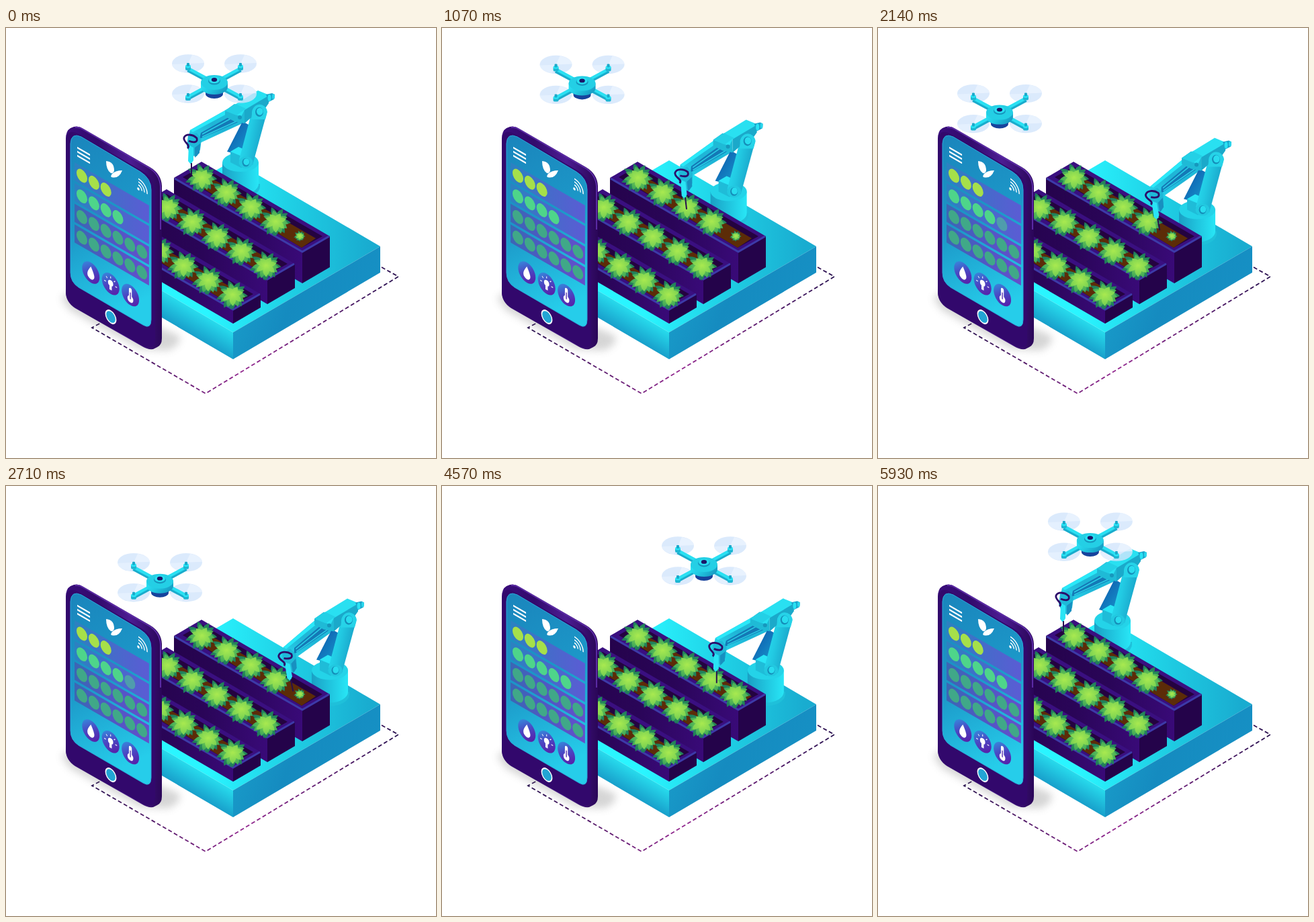
An HTML page that plays this animation: 640x640 px, repeating every 6000 ms.

```html
<!DOCTYPE html>
<html lang="en">
<head>
<meta charset="utf-8">
<title>Smart farm</title>
<style>
html, body { margin: 0; width: 100%; height: 100%; overflow: hidden; background: #fff; }
svg { display: block; width: 100%; height: 100%; }
</style>
</head>
<body>
<svg id="stage" viewBox="0 0 640 640"></svg>
<script>
const poly = (points, fill) => `<polygon points="${points}" fill="${fill}"/>`;
const path = (d, fill, extra = '') => `<path d="${d}" fill="${fill}" ${extra}/>`;
const line = (d, color, width, extra = '') =>
  `<path d="${d}" fill="none" stroke="${color}" stroke-width="${width}" ${extra}/>`;
const oval = (x, y, rx, ry, fill, extra = '') =>
  `<ellipse cx="${x}" cy="${y}" rx="${rx}" ry="${ry}" fill="${fill}" ${extra}/>`;
const group = (content, attrs) => `<g ${attrs}>${content}</g>`;
const at = (x, y) => `transform="translate(${x} ${y})"`;
const repeat = (n, make) => Array.from({ length: n }, (_, i) => make(i)).join('');
// Places a flat drawing on the isometric phone screen.
const onScreen = (x, y, content) => group(content, `transform="matrix(.866 .5 0 1 ${x} ${y})"`);

const gradient = (id, x1, y1, x2, y2, colors, units = 'objectBoundingBox') =>
  `<linearGradient id="${id}" x1="${x1}" y1="${y1}" x2="${x2}" y2="${y2}" gradientUnits="${units}">` +
  colors.map((c, i) => `<stop offset="${i / (colors.length - 1)}" stop-color="${c}"/>`).join('') +
  '</linearGradient>';
const spread = (id, x1, y1, x2, y2, colors) => gradient(id, x1, y1, x2, y2, colors, 'userSpaceOnUse');

const leafShades = [['#36a05a', '#1d7a5a'], ['#84d44e', '#2f9f5c'], ['#a6e850', '#62c654']];
const defs = `<defs>
  ${spread('top', 300, 0, 540, 0, ['#2af5ff', '#1fd0e5', '#19acd0'])}
  ${spread('sideL', 260, 408, 243, 437, ['#27daec', '#18a0cb'])}
  ${gradient('sideR', 0, 0, 1, .3, ['#1aa2cd', '#158bc0', '#1690c4'])}
  ${spread('dash', 128, 0, 584, 0, ['#28104f', '#93278f', '#28104f'])}
  ${gradient('boxL', 0, 0, 1, 0, ['#25034c', '#2a0558', '#390a78'])}
  ${gradient('phone', 0, 0, 1, 0, ['#3a0d7c', '#320a6c', '#4c1c92', '#2a0658'])}
  ${gradient('screen', 0, 0, .2, 1, ['#1a85bc', '#1c97c8', '#26cdea'])}
  ${gradient('bar', 0, 0, 1, 0, ['#2b82c1', '#456bca', '#5b5cd4'])}
  ${gradient('bar2', 0, 0, 1, 0, ['#3b66b4', '#5057c4', '#644fcb'])}
  ${gradient('button', 0, 0, .8, 1, ['#2f9fe4', '#4a49c4', '#5a1aa6'])}
  ${gradient('tube', 0, 0, 1, 0, ['#1a9fc4', '#20c4de', '#28e6f6'])}
  ${gradient('link', 0, 0, 1, .4, ['#2ae6f7', '#22c9e2', '#189fc6'])}
  ${gradient('back', 0, 0, 1, 1, ['#0e4fa6', '#1278bd', '#1aa0cf'])}
  ${gradient('beam', 0, 1, 1, 0, ['#2ad8ee', '#1fb4d6', '#20c4de'])}
  ${leafShades.map((colors, i) => spread('leaf' + i, 0, 0, 0, -25, colors)).join('')}
  <filter id="soft" x="-50%" y="-50%" width="200%" height="200%"><feGaussianBlur stdDeviation="6"/></filter>
</defs>`;

const outline = line('M559 356L584 370L297 544L128 446L141 439', 'url(#dash)', 1.8, 'stroke-dasharray="6 3.6"');

const platform =
  poly('338,197 557,325 338,453 119,325', 'url(#top)') +
  poly('119,325 338,453 338,493 119,365', 'url(#sideL)') +
  poly('557,325 557,364 338,493 338,453', 'url(#sideR)');

// A planter is placed by the right corner of its rim.
function planter(x, y, h) {
  return group(
    poly(`-232,-87 -41,24 -41,${24 + h} -232,${h - 87}`, 'url(#boxL)') +
    poly(`0,0 0,${h} -41,${24 + h} -41,24`, '#24034a') +
    poly('-232,-87 -191,-111 0,0 -41,24', '#3a0f80') +
    line('M-231 -86L-41 23L-1 0', '#3d3aa8', 3) +
    poly('-219,-88 -191,-104 -11,0 -42,17', '#240340') +
    poly('-210,-84 -191,-95 -21,3 -42,17', '#5c2c08'), at(x, y));
}

// Three rings of leaves whose tips droop outwards, lighter towards the middle.
function ring(r) {
  const n = 10 - r;
  return repeat(n, i => {
    const angle = (i + .5) * 360 / n - 180 + 13 * Math.sin(i * 5 + r * 2);
    const length = 25 - r * 4 + 2 * Math.sin(i * 7 + r);
    const w = (angle < 0 ? -1 : 1) * 9;
    return path(`M0 3Q${w} ${-length * .45} ${w * .5} ${-length}Q${-w} ${-length * .6} 0 3`,
      `url(#leaf${r})`, `transform="rotate(${angle})"`);
  });
}
const plant = group(repeat(3, ring), 'transform="scale(.95 .86)"');
const plants = (x, y, n) => repeat(n, i => group(plant, at(x + i * 36.6, y + i * 21.7)));

function phone() {
  const body = path('M89 165Q89 153 96 149L101 147Q108 145 115 150L214 207Q231 217 232 235L232 462Q232 472 225 475L219 478Q211 479 203 474L103 417Q89 408 89 392Z', 'url(#phone)') +
    line('M103 148Q109 147 115 151L213 208Q229 218 230 236L230 300', '#5b2ba4', 2) +
    path('M89 168Q90 149 107 157L203 213Q221 224 222 244L222 463Q222 480 205 474L103 416Q89 408 89 392Z', '#32086c') +
    path('M96 172Q97 155 112 162L200 214Q216 224 216 241L216 434Q216 449 204 442L108 386Q96 378 96 364Z', 'url(#screen)', 'stroke="#2aa9da"');

  const header = onScreen(106, 178, line('M0 0H22M0 6H22M0 12H22', '#fff', 2.4)) +
    path('M149 198Q161 199 161 212Q160 217 156 216Q149 211 149 198', '#fff') +
    path('M173 212Q168 225 157 222Q155 221 158 217Q163 212 173 212', '#fff') +
    onScreen(197, 239.5, oval(0, 0, 2, 2, '#fff') + repeat(3, i => {
      const r = 6 + i * 4.6;
      return line(`M0 ${-r}A${r} ${r} 0 0 1 ${r} 0`, '#fff', 1.8);
    }));

  const dots = ['#a6e04a', '#4ed58a', '#40a888', '#40a888'];
  const bars = repeat(4, row => onScreen(102, 213.6 + row * 30.7,
    `<rect y="-13.5" width="128" height="27" fill="url(#${row < 2 ? 'bar' : 'bar2'})"/>` +
    repeat([3, 5, 6, 6][row], i =>
      oval(12.7 + i * 20.6, 0, 9.3, 9.3, dots[row], row == 1 && i == 4 ? 'id="newDot"' : ''))));

  const icons = [
    path('M0 -9Q6 0 6 4A6 6 0 0 1 -6 4Q-6 0 0 -9', '#fff'),
    oval(0, -1, 4.5, 4.5, '#fff') + '<rect x="-2" y="3" width="4" height="6" fill="#fff"/>' +
      repeat(5, i => line('M0 -8V-11', '#fff', 1.2, `transform="rotate(${i * 45 - 90})"`)),
    line('M0 -8V5', '#fff', 5, 'stroke-linecap="round"') + oval(0, 6, 5, 5, '#fff') + line('M0 -4V6', '#5530b0', 1.6)
  ];
  const buttons = repeat(3, i =>
    onScreen(126.3 + i * 29.4, 364 + i * 16.8, oval(0, 0, 15, 15, 'url(#button)') + icons[i]));
  return body + header + bars + buttons +
    onScreen(156, 430, oval(0, 0, 8.8, 8.8, '#22a5d5', 'stroke="#fff" stroke-width="1.8"'));
}

const shadow = path('M82 402L100 390L215 440L258 458Q262 472 240 480L200 478L95 420Z', '#777', 'opacity=".3" filter="url(#soft)"');

const joint = (x, y, r) => oval(x, y, r, r * 1.15, '#158eb9') + oval(x + .8, y - .8, r * .8, r * .92, '#29dcef');

const base =
  path('M320 232V236A29 17 0 0 0 378 236V232Z', '#1fc0da') +
  path('M322 200V232A27 16 0 0 0 376 232V200Z', 'url(#tube)') +
  oval(349, 200, 27, 14, '#24d3e8');

const forearm =
  poly('329,121 274,152 271,164 289,171 354,141 352,125', 'url(#beam)') +
  poly('338,129 290,156 288,165 350,138', '#1479b6') +
  line('M336 134L292 158M345 138L292 162', '#29cde6', 1.6) +
  poly('329,121 274,152 278,155 334,125', '#2ae8f8') +
  poly('271,160 284,156 291,166 289,181 284,191 275,190 269,176', '#1fb9d8') +
  poly('272,174 279,178 279,197 275,203 271,198', '#2ae4f5') +
  poly('281,178 289,172 288,186 281,193', '#188fc0') +
  line('M270 179C276 174 263 170 265 163C268 157 278 158 284 164C286 172 277 170 272 168', '#2c0a6a', 2.8) +
  line('M276 201V219', '#27104f', 2);

const head =
  poly('352,139 365,146 352,190 329,184', 'url(#back)') +
  poly('334,184 346,177 364,185 364,203 350,208 334,200', '#1fbcd8') +
  poly('334,184 346,177 364,185 351,191', '#2ae5f6') +
  poly('347,196 367,120 388,127 367,204', 'url(#link)') +
  oval(357, 200, 10.5, 9, '#22c8e0') + joint(357, 200, 5.5) +
  poly('355,121 391,100 391,112 384,122 370,129 355,142', '#1ba9ca') +
  poly('326,123 340,113 355,121 355,142 340,139 326,132', '#1fbad6') +
  poly('326,123 375,93 392,100 355,122 350,132', '#29e0f1') +
  poly('326,123 342,113 357,120 343,130', '#24d0e6') +
  oval(348, 133, 3, 3, '#1797bd') +
  poly('387,99 396,97 400,99 399,106 391,110', '#1aa4cb') +
  oval(392, 104, 2.5, 5, '#29e2f3') + oval(398, 102, 2, 4, '#29d6ec') +
  path('M366 128A11 12 0 0 1 389 125L386 136L365 136Z', '#26d3e8') +
  joint(377, 125, 6);

function drone() {
  const corners = part => repeat(4, i => group(part, at(i % 2 ? 39 : -39, i < 2 ? -32 : 13)));
  const rotor = oval(0, 0, 24, 13.7, '#d3e5fc', 'opacity=".8"') +
    path('M0 0L6 -13A24 13.7 0 0 1 24 -1Z', '#eef5ff', 'opacity=".7"') +
    path('M0 0L-6 13A24 13.7 0 0 1 -24 1Z', '#eef5ff', 'opacity=".5"');
  const motor = '<rect x="-4" y="3" width="8" height="7" rx="2" fill="#1db6d2"/>' +
    oval(0, 4, 4, 2.4, '#2ae6f6') + '<rect x="-2" y="-1" width="4" height="5" rx="1" fill="#1ba9ca"/>';
  const arms = 'M-39 -23L39 19M39 -23L-39 19';
  return corners(rotor) +
    path('M-13 4V13A13 7 0 0 0 13 13V4Z', '#17439c') +
    line(arms, '#1aaccc', 7) + group(line(arms, '#2ae0f2', 4.5), at(0, -2)) + corners(motor) +
    path('M-20 -4V3A20 11 0 0 0 20 3V-4Z', 'url(#link)') +
    oval(0, -4, 20, 11, '#24cfe5') +
    oval(0, -6, 9, 5.5, '#1797be') + oval(0, -7.5, 8, 4.8, '#2ae0f2') + oval(0, -8, 4.2, 2.9, '#1b1768');
}

const stage = document.getElementById('stage');
stage.innerHTML = defs + outline + platform + group(base, 'id="base"') +
  planter(482, 310, 46) + plants(292, 223, 4) +
  planter(430, 351, 36) + plants(241, 267, 5) +
  planter(379, 396, 20) + plants(228, 332, 4) +
  group(group(forearm, 'id="forearm"') + head, 'id="arm"') +
  group(plant, 'id="sprout"') +
  shadow + phone() + group(drone(), 'id="drone"');

const LOOP = 6000, FRAMES = 84, REACH = 133;

// The drone passes these points at equal time steps on a smooth closed curve.
const route = [[310, 85], [253, 83], [198, 89], [161, 113], [204, 140],
  [253, 148], [306, 150], [363, 136], [396, 111], [354, 87]];
function dronePlace(t) {
  const n = route.length, s = t / LOOP * n, i = Math.floor(s), u = s - i;
  return [0, 1].map(axis => {
    const [a, b, c, d] = [-1, 0, 1, 2].map(k => route[(i + k + n) % n][axis]);
    return b + u * (c - a + u * (2 * a - 5 * b + 4 * c - d + u * (3 * (b - c) + d - a))) / 2;
  });
}

const progress = (t, a, b) => Math.min(1, Math.max(0, (t - a) / (b - a)));
const ramp = (t, a, b) => {
  const u = progress(t, a, b);
  return u * u * (3 - 2 * u);
};

const [baseEl, armEl, forearmEl, sproutEl, droneEl, dotEl] =
  ['base', 'arm', 'forearm', 'sprout', 'drone', 'newDot'].map(id => document.getElementById(id));
const move = (el, value) => el.setAttribute('transform', value);

function draw(time) {
  const step = LOOP / FRAMES;
  const t = Math.floor((time % LOOP + 9) / step) % FRAMES * step;
  const out = Math.sin(progress(t, 0, 2700) * Math.PI / 2);
  const shift = REACH * (out - ramp(t, 4540, 5930));
  const place = `translate(${shift} ${shift * .56})`;
  move(baseEl, place);
  move(armEl, place);
  move(forearmEl, `rotate(${-11 * (out - ramp(t, 3700, 4540))} 348 130)`);
  const size = .37 + .63 * (ramp(t, 2750, 3250) - ramp(t, 5150, 5900));
  move(sproutEl, `translate(437.5 309.5) scale(${size})`);
  move(droneEl, `translate(${dronePlace(t)})`);
  dotEl.setAttribute('opacity', .5 * ramp(t, 1250, 1650) + .5 * ramp(t, 3200, 3320));
}

const start = performance.now();
function tick() {
  draw(performance.now() - start);
  requestAnimationFrame(tick);
}
tick();
</script>
</body>
</html>
```
